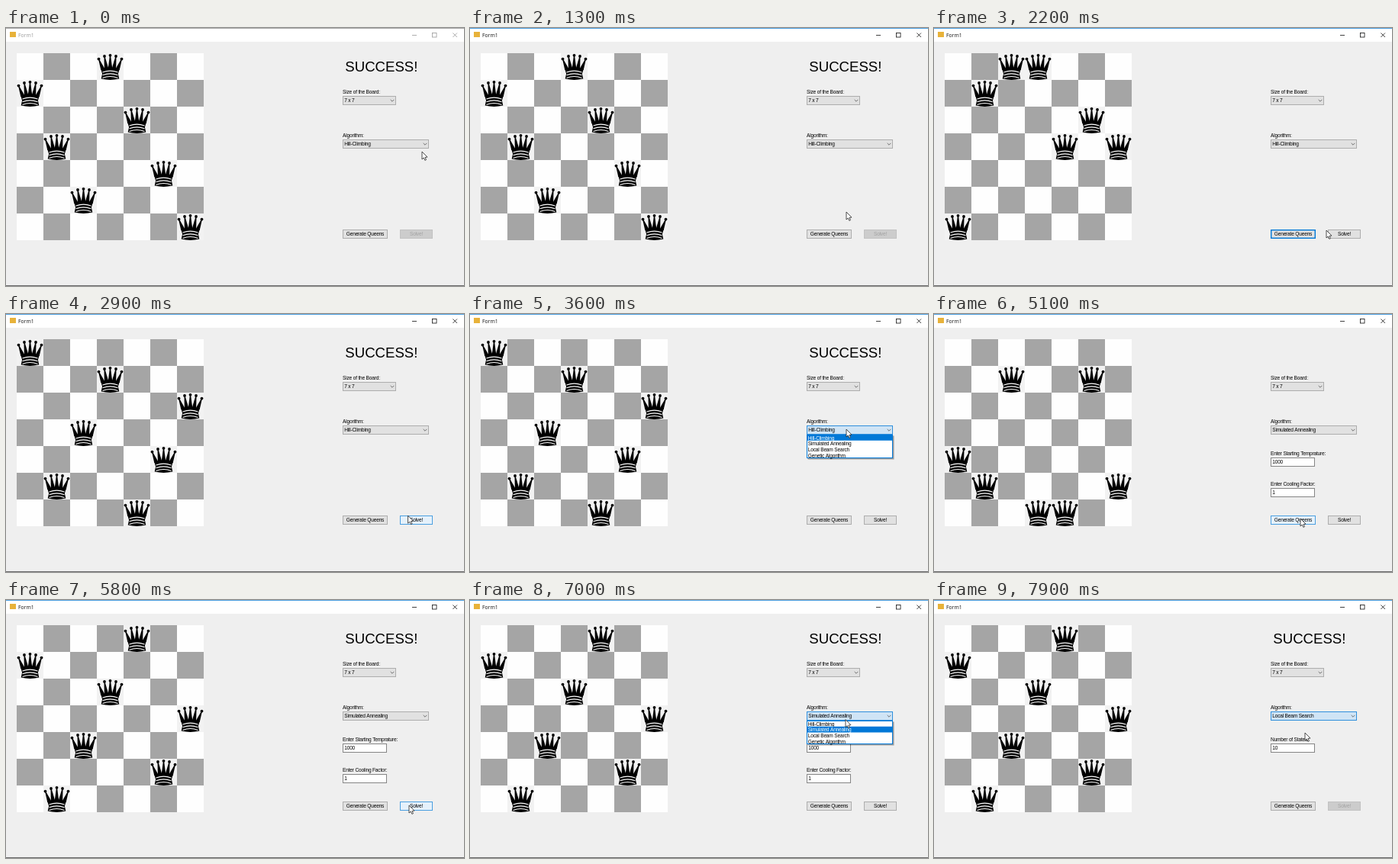
Recreate the animation shown at these times as an HTML page with a canvas. Size 600 by 338 pixels, loop 8 s.

```html
<!DOCTYPE html>
<html lang="en">
<head>
<meta charset="utf-8">
<title>Form1</title>
<style>
  html, body { margin: 0; width: 100%; height: 100%; overflow: hidden; background: #f0f0f0; }
  canvas { display: block; width: 600px; height: 338px; }
</style>
</head>
<body>
<canvas id="stage"></canvas>
<script>
const W = 600, H = 338, LOOP = 8000, STEP = 100;
const BLUE = '#0078d7';
const SANS = '"Liberation Sans", Arial, sans-serif';
const canvas = document.getElementById('stage');
const ctx = canvas.getContext('2d');
const ratio = window.devicePixelRatio || 1;
canvas.width = W * ratio;
canvas.height = H * ratio;

const rect = (x, y, w, h) => ({ x, y, w, h });
const point = (x, y) => ({ x, y });
const GENERATE = rect(441, 264, 59, 12);
const SOLVE = rect(516, 264, 43, 12);
const SIZE_BOX = rect(441, 89, 70, 12);
const ALGO_BOX = rect(441, 146, 113, 12);
const LIST = rect(441, 158, 113, 31);
const ALGORITHMS = ['Hill-Climbing', 'Simulated Annealing', 'Local Beam Search', 'Genetic Algorithm'];
const ROW = LIST.h / ALGORITHMS.length;
const N = 7, CELL = 35, BOARD = point(14, 33);

// A knight-like stride around the columns gives a valid placement
const stride = (step, first) => Array.from({ length: N }, (_, c) => (c * step + first) % N);
const scattered = Array.from({ length: N }, (_, c) => (c * c + 4) % N);

const onGenerate = point(480, 268), onSolve = point(528, 269), onCombo = point(493, 151);
const onItem = i => point(488, LIST.y + ROW * (i + 0.6));

const generate = rows => ({ rows, success: false, solvable: true, focus: 'generate' });
const solve = rows => ({ rows, success: true, focus: 'solve' });
const open = { open: true, focus: 'algo' };
const choose = (algo, focus) => ({ algo, focus, open: false, solvable: false });

const initial = { rows: stride(2, 1), success: true, solvable: false, algo: 0, open: false, focus: '' };

// Pointer arrives at a place, then acts 100 ms later
const script = [
  { time: 0, to: point(545, 162) },
  { time: 1300, to: point(493, 241) },
  { time: 1600, to: onGenerate, act: generate([6, 1, 0, 0, 3, 2, 3]) },
  { time: 2200, to: point(514, 265) },
  { time: 2800, to: onSolve, act: solve(stride(5, 0)) },
  { time: 3400, to: onCombo, act: open },
  { time: 3900, to: onItem(1), act: choose(1, 'temperature') },
  { time: 4500, to: point(489, 217) },
  { time: 4800, to: onGenerate, act: generate(scattered) },
  { time: 5500, to: onSolve, act: solve(stride(5, 1)) },
  { time: 6700, to: onCombo, act: open },
  { time: 7200, to: onItem(2), act: choose(2, 'algo') },
  { time: 7800, to: point(486, 174) }
];

function stateAt(t) {
  return Object.assign({}, initial, ...script.filter(s => t >= s.time + STEP).map(s => s.act));
}

function pointerAt(t) {
  let p = script[0].to;
  for (const { time, to } of script) {
    const dx = to.x - p.x, dy = to.y - p.y;
    const travel = 200 + 3 * Math.hypot(dx, dy);
    const u = Math.min(1, (t - time + travel) / travel);
    if (u <= 0) break;
    const e = u * u * (3 - 2 * u);
    p = point(p.x + dx * e, p.y + dy * e);
  }
  return p;
}

const inside = (p, r) => p.x >= r.x && p.x < r.x + r.w && p.y >= r.y && p.y < r.y + r.h;

function fill(x, y, w, h, color) {
  ctx.fillStyle = color;
  ctx.fillRect(x, y, w, h);
}

function box(r, back, edge, line = 1) {
  fill(r.x, r.y, r.w, r.h, back);
  ctx.strokeStyle = edge;
  ctx.lineWidth = line;
  ctx.strokeRect(r.x + line / 2, r.y + line / 2, r.w - line, r.h - line);
}

function trace(...points) {
  ctx.beginPath();
  points.forEach(([x, y]) => ctx.lineTo(x, y));
}

function stroke(color, width) {
  ctx.strokeStyle = color;
  ctx.lineWidth = width;
  ctx.stroke();
}

function text(s, x, y, { color = '#000', size = 6.6, gap = -0.2, family = SANS, align = 'left' } = {}) {
  ctx.font = `${size}px ${family}`;
  ctx.letterSpacing = gap + 'px';
  ctx.textAlign = align;
  ctx.fillStyle = color;
  ctx.fillText(s, x, y);
}

function titleBar(active) {
  const ink = active ? '#111' : '#999';
  fill(0, 0, W, 18, '#fff');
  fill(0, 0, W, 1, active ? '#4c9fe0' : '#aaa');
  fill(5, 5, 8, 7, '#e8b23a');
  text('Form1', 16, 11.6, { color: ink, size: 6.8, gap: 0, family: '"Open Sans", sans-serif' });
  trace([532, 9.5], [538, 9.5]);
  stroke(ink, 0.8);
  ctx.strokeRect(558.5, 6.5, 5.5, 5.5);
  for (const d of [-2.75, 2.75]) {
    trace([588.2 - d, 6.5], [588.2 + d, 12]);
    stroke(ink, 0.8);
  }
}

function queen(x, y) {
  ctx.save();
  ctx.translate(x, y);
  fill(0, 0, CELL, CELL, '#f2f2f2');
  ctx.translate(CELL / 2, 0);
  ctx.fillStyle = '#000';
  for (let i = -2; i <= 2; i++) {
    const bx = i * 7.5, by = 2.8 + 1.2 * i * i;
    ctx.beginPath();
    ctx.arc(bx, by, 1.9, 0, 7);
    ctx.fill();
    trace([bx - 0.5, by], [bx + 0.5, by], [i * 4.6 + 3, 22], [i * 4.6 - 3, 22]);
    ctx.fill();
  }
  trace([-12.2, 21], [12.2, 21], [10.4, 27], [11.8, 33.6]);
  ctx.quadraticCurveTo(0, 36.4, -11.8, 33.6);
  ctx.lineTo(-10.4, 27);
  ctx.fill();
  for (const by of [25, 28.8, 32.4]) {
    ctx.beginPath();
    ctx.moveTo(-10, by);
    ctx.quadraticCurveTo(0, by - 3.8, 10, by);
    stroke('#fff', 1.1);
  }
  ctx.restore();
}

function board(rows) {
  for (let i = 0; i < N * N; i++) {
    const r = Math.floor(i / N), c = i % N;
    const x = BOARD.x + c * CELL, y = BOARD.y + r * CELL;
    if (rows[c] === r) queen(x, y);
    else fill(x, y, CELL, CELL, i % 2 ? '#a5a5a5' : '#fefefe');
  }
}

function button(r, label, { enabled = true, hover, focus }) {
  if (!enabled) box(r, '#cccccc', '#c2c2c2');
  else if (hover) box(r, '#e5f1fb', '#4a9fe0');
  else box(r, '#e1e1e1', focus ? BLUE : '#adadad', focus ? 1.4 : 1);
  text(label, r.x + r.w / 2, r.y + 8.4, { align: 'center', color: enabled ? '#000' : '#a3a3a3' });
}

function combo(r, label, hot) {
  box(r, hot ? '#cfe4f5' : '#e1e1e1', hot ? '#2f8fdc' : '#adadad');
  text(label, r.x + 2.2, r.y + 8.4);
  const cx = r.x + r.w - 5, cy = r.y + 6;
  trace([cx - 2.3, cy - 1.1], [cx, cy + 1.2], [cx + 2.3, cy - 1.1]);
  stroke('#555', 0.8);
}

function field(label, value, y, focus) {
  text(label, 441, y - 2.7);
  box(rect(441, y, 58, 12), '#fff', focus ? '#444' : '#858585');
  text(value, 443.2, y + 8.4);
}

function dropdown(pointer, current) {
  fill(LIST.x + 1.5, LIST.y + 1.5, LIST.w, LIST.h, 'rgba(0,0,0,.35)');
  box(LIST, '#fff', BLUE);
  const over = Math.floor((pointer.y - LIST.y) / ROW);
  const marked = over < 0 ? current : over;
  ALGORITHMS.forEach((name, i) => {
    const top = LIST.y + i * ROW;
    if (i === marked) fill(LIST.x + 1, top, LIST.w - 2, ROW, BLUE);
    text(name, LIST.x + 1.8, top + 6.5, { color: i === marked ? '#fff' : '#000' });
  });
}

function arrow({ x, y }) {
  ctx.save();
  ctx.translate(x, y);
  trace([0, 0], [0, 10], [2.3, 8], [3.9, 11.4], [5.5, 10.6], [4, 7.4], [7, 7.1]);
  ctx.closePath();
  ctx.fillStyle = '#fff';
  ctx.fill();
  stroke('#222', 0.8);
  ctx.restore();
}

function draw(t) {
  const p = pointerAt(t), s = stateAt(t);
  ctx.setTransform(ratio, 0, 0, ratio, 0, 0);
  fill(0, 0, W, H, '#efefef');
  titleBar(t >= STEP);
  fill(0, H - 1, W, 1, '#6a6a6a');
  board(s.rows);

  if (s.success) text('SUCCESS!', 444.3, 57.3, { size: 18.6, gap: 0 });
  text('Size of the Board:', 441, 86);
  combo(SIZE_BOX, '7 x 7', false);
  text('Algorithm:', 441, 142.8);
  combo(ALGO_BOX, ALGORITHMS[s.algo], s.focus === 'algo' || inside(p, ALGO_BOX));

  if (s.algo === 1) {
    field('Enter Starting Temprature:', '1000', 188, s.focus === 'temperature');
    field('Enter Cooling Factor:', '1', 228);
  } else if (s.algo === 2) {
    field('Number of States:', '10', 188);
  }

  button(GENERATE, 'Generate Queens', { hover: inside(p, GENERATE), focus: s.focus === 'generate' });
  button(SOLVE, 'Solve!', { enabled: s.solvable, hover: inside(p, SOLVE), focus: s.focus === 'solve' });
  if (s.open) dropdown(p, s.algo);
  arrow(p);
}

const start = performance.now();
function tick() {
  const t = (performance.now() - start) % LOOP;
  draw(Math.floor(t / STEP) * STEP);
  requestAnimationFrame(tick);
}
tick();
</script>
</body>
</html>
```
